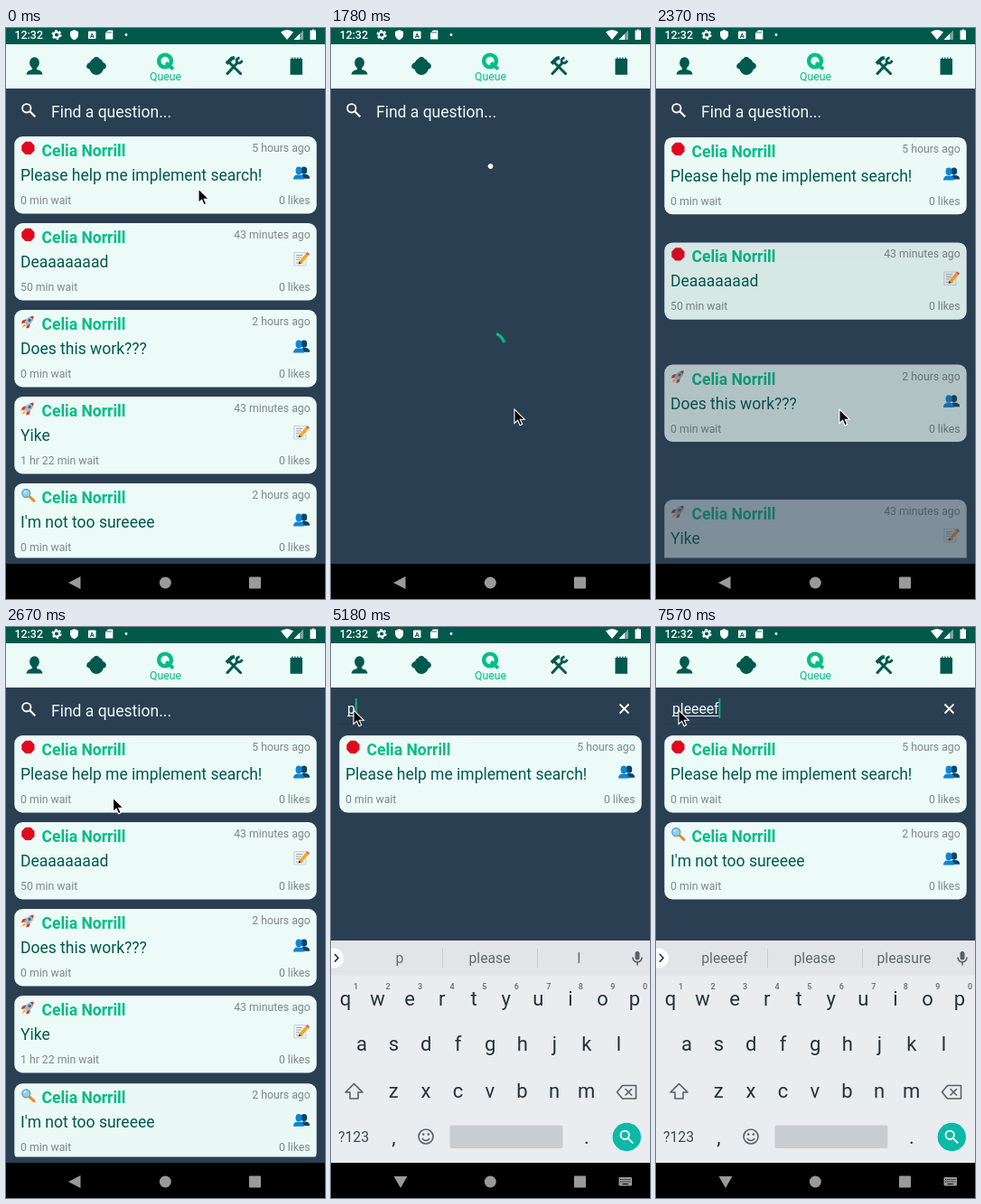
Animation, 353 px wide and 632 px high, one loop 8000 ms. Source, as an HTML page:

```html
<!DOCTYPE html>
<html lang="en">
<head>
<meta charset="utf-8">
<title>Queue search</title>
<style>
html, body { margin: 0; width: 100%; height: 100%; overflow: hidden; background: #2b3f53; }
svg { display: block; }
text { font-family: Roboto, "Noto Sans", sans-serif; white-space: pre; }
.name { font-size: 17.5px; font-weight: 700; fill: #00be85; }
.title { font-size: 17.5px; fill: #00594c; }
.meta { font-size: 12.25px; fill: #7d8886; }
.end { text-anchor: end; }
.mid { text-anchor: middle; }
.field { font-size: 15.75px; fill: #ecfaf6; }
.word { font-size: 15.75px; fill: #616b70; text-anchor: middle; }
.key { font-size: 22px; fill: #253238; text-anchor: middle; }
.hint { font-size: 9px; fill: #626c71; text-anchor: middle; font-weight: 500; }
.line { fill: none; stroke: #566167; stroke-width: 1.6; }
.round { stroke-linecap: round; stroke-linejoin: round; }
</style>
</head>
<body>
<svg id="stage" width="353" height="632" viewBox="0 0 353 632">
  <defs>
    <clipPath id="window"><rect id="windowBox" y="107" width="353" height="479.4"/></clipPath>
    <g id="stop"><path d="M5 .6h5.800l4.200 4.200v5.800l-4.200 4.200H5L.8 10.600V4.800z" fill="#e2081d"/></g>
    <g id="rocket">
      <path d="M6 5 1.5 6.5.5 10l4-1zM10.500 10 9 14.500 5.800 15.300 6.600 11z" fill="#d3342f"/>
      <path d="M3.600 10.400 1 14.800l4.600-2.400z" fill="#f5a623"/>
      <path d="M14 1.500Q9 1.500 6 5.200L3.800 9.200l3 3 4-2.300Q14.200 7 14 1.500z" fill="#a9bac4"/>
      <path d="M14 1.500q-2 0-3.800.9l3 3q.9-1.800.8-3.900z" fill="#d3342f"/>
      <circle cx="9.600" cy="6.200" r="1.600" fill="#31688d"/>
    </g>
    <g id="lens"><path d="m9.500 9.500 5 4.600" stroke="#ef8b22" stroke-width="3" stroke-linecap="round"/><circle cx="5.800" cy="5.800" r="4.500" fill="#8fd0f2" stroke="#6e9db8" stroke-width="1.300"/><path d="M3.300 5.400Q4 3.400 6 3.300" fill="none" stroke="#e6f7ff" stroke-width="1.200"/></g>
    <g id="people">
      <g fill="#0b4468"><ellipse cx="11.800" cy="4.200" rx="3.400" ry="4.100"/><path d="M7 13.200Q8 9 11 8.600h3.200q3.900.5 3.900 4.600z"/></g>
      <g fill="#0d86d6"><ellipse cx="6" cy="4.400" rx="3.500" ry="4.300"/><path d="M0 14q0-4.400 3.900-5h4q3.900.6 3.900 5z"/></g>
    </g>
    <g id="memo">
      <path d="M.8 2h13v14.500h-13z" fill="#eef1f2" stroke="#c0cacc" stroke-width=".8"/>
      <path d="M3 5h7M3 7.500h6M3 10h4M3 13.500h8" stroke="#9fadb2"/>
      <path d="m6.300 11.800 7.800-8.900 2.700 2.400-7.800 8.800z" fill="#f9a51a"/>
      <path d="m14.100 2.900 1.200-1.400 2.700 2.400-1.200 1.400z" fill="#e0485a"/>
      <path d="m6.300 11.800-.7 3.200 3.400-.9z" fill="#4a4038"/>
    </g>
  </defs>

  <rect width="353" height="632" fill="#2b3f53"/>
  <g id="list" clip-path="url(#window)"></g>

  <!-- status bar -->
  <rect width="353" height="18" fill="#00594b"/>
  <g fill="#fff">
    <text x="9.5" y="12" font-size="12.4" font-weight="500">12:32</text>
    <circle cx="56" cy="7.5" r="3.2" fill="none" stroke="#fff" stroke-width="2.2"/>
    <circle cx="56" cy="7.5" r="4.8" fill="none" stroke="#fff" stroke-width="1.5" stroke-dasharray="2.5 2.53"/>
    <path d="m75.500 2 4.500 2v3.500q0 4-4.500 5.800Q71 11.500 71 7.500V4z"/>
    <rect x="91" y="3.500" width="8.500" height="8.500" rx=".8"/>
    <path d="M113 2.500h5.300v10h-8.300V5.500z"/>
    <circle cx="133" cy="7.500" r="1.400"/>
    <path d="M304 4.500q7-5 14 0l-7 8.500z"/>
    <path d="M329 2.500v10.500h-10.500z" opacity=".45"/><path d="M325 6.500v6.500h-6.500z"/>
    <path d="M338 2.500h1V1.500h2v1h2v10.500h-6.500V2.500z"/>
  </g>
  <text x="95.200" y="10.500" class="mid" font-size="7.500" font-weight="700" fill="#00594b">A</text>
  <path d="M112 4v2M114 4v2M116 4v2" stroke="#00594b" stroke-width=".8"/>

  <!-- tabs -->
  <rect y="18" width="353" height="49" fill="#ecfbf7"/>
  <g fill="#00594c">
    <ellipse cx="31.500" cy="38.500" rx="5.400" ry="6.300"/>
    <path d="M29 42h5v4q6 .8 6.500 5.500h-18Q23 46.800 29 46z"/>
    <path d="M93 38q1-3 3.500-4 1.500-2.500 3.500-2 2.500-.2 3.500 2 3 1.200 3.800 4 3.500 1.300 3.600 4.500-.4 2.800-3 3-2 6.300-8 6.500-5.500-.2-7.500-6.500-3-.3-3.300-3 .2-3.200 3.900-4.500z"/>
    <path d="M314.500 34h1.700v-1.500h1.300V34h1.700v-1.500h1.300V34h1.700v-1.500h1.300V34h1.700v-1.500h1.300V34h1.500v17.700h-13.500z"/>
  </g>
  <g fill="none" stroke="#00594c">
    <path d="m248 39 11.500 11.500" stroke-width="3" stroke-linecap="round"/>
    <path d="m256 38.500-11 12" stroke-width="3" stroke-linecap="round"/>
    <path d="m244 39.500 6-6 3-.5" stroke-width="4"/>
    <path d="M258.500 32.800q-4.500 1.200-3 5.200 3.500 2.500 6-2" stroke-width="2.800"/>
  </g>
  <g fill="none" stroke="#00be85">
    <circle cx="176" cy="36.500" r="6.900" stroke-width="4.400"/>
    <path d="m177 38.500 8 7" stroke-width="3.800"/>
  </g>
  <text x="176.500" y="58" class="mid" font-size="12.250" fill="#00be85">Queue</text>

  <!-- search field -->
  <g id="glass" fill="none" stroke="#fff" stroke-width="1.800"><circle cx="22.800" cy="88.800" r="4.700"/><path d="m26.300 92.300 6 6" stroke-width="2.200"/></g>
  <text id="holder" x="50" y="99" font-size="17.500" fill="#ecfaf6">Find a question...</text>
  <g id="focus">
    <path d="M9 107.500h335" stroke="#263848"/>
    <path d="m319.500 85.500 10 10m0-10-10 10" stroke="#fff" stroke-width="1.800"/>
    <text id="typed" class="field" x="18" y="96"></text>
    <path id="under" stroke="#ecfaf6" fill="none"/>
    <rect id="caret" y="79" width="1.700" height="22" fill="#00be85"/>
  </g>

  <!-- loaders -->
  <path id="spin" fill="none" stroke="#00be85" stroke-width="3.200"/>
  <g id="puller"><circle r="18" fill="#14222e" opacity=".25" cy="1"/><circle r="17.500" fill="#fafafa"/><path id="pullArc" d="M7 0A7 7 0 1 1 2-6.700" fill="none" stroke="#222" stroke-width="2.200"/></g>

  <g id="board"></g>

  <!-- navigation bar -->
  <rect y="593" width="353" height="39"/>
  <g fill="#9a9a9a">
    <path id="back"/>
    <circle cx="176.300" cy="614" r="6.500"/>
    <rect x="269" y="607.500" width="13" height="13" rx=".8"/>
    <g id="switch"><rect x="318.500" y="609" width="14.500" height="9.500" rx="1"/><path d="M320 611.500h12M320 614h12" stroke="#000" stroke-width="1.200" stroke-dasharray="1.300 1"/><path d="M322.500 616.500h6.500" stroke="#000"/></g>
  </g>

  <path id="mouse" d="M0 0v15.500l3.600-3.300 2.500 5.600 2.600-1.200-2.500-5.400h5z" stroke="#fff" stroke-width="1.100"/>
</svg>
<script>
const $ = id => document.getElementById(id);
const show = (id, on) => $(id).style.display = on ? '' : 'none';
const LOOP = 8000, TICK = 148.2;

const person = 'Celia Norrill';
const questions = [
  ['stop', 'Please help me implement search!', '5 hours ago', '0 min wait', 'people'],
  ['stop', 'Deaaaaaaad', '43 minutes ago', '50 min wait', 'memo'],
  ['rocket', 'Does this work???', '2 hours ago', '0 min wait', 'people'],
  ['rocket', 'Yike', '43 minutes ago', '1 hr 22 min wait', 'memo'],
  ['lens', "I'm not too sureeee", '2 hours ago', '0 min wait', 'people']
];
$('list').innerHTML = questions.map(([mark, title, age, wait, kind]) => `<g>
  <rect x="9.3" width="334.4" height="85.4" rx="9" fill="#ecfbf7"/>
  <use href="#${mark}" x="16.5" y="5.2"/>
  <text class="name" x="39.5" y="22">${person}</text>
  <text class="title" x="16" y="49">${title}</text>
  <text class="meta" x="16" y="75">${wait}</text>
  <text class="meta end" x="336.7" y="17">${age}</text>
  <text class="meta end" x="336.7" y="75">0 likes</text>
  <use href="#${kind}" x="318" y="${kind === 'memo' ? 30.5 : 33.5}"/></g>`).join('');
const cards = [...$('list').children];

function keyRow(letters, x, y) {
  return [...letters].map((c, i) => `<text class="key" x="${x + i * 35.55}" y="${y}">${c}</text>`).join('');
}
$('board').innerHTML = `
  <rect y="347" width="353" height="246" fill="#e9edf0"/>
  <rect y="347" width="353" height="38.5" fill="#e1e5e7"/>
  <path d="M123.500 356v21M228.500 356v21" stroke="#c6cccf"/>
  <circle cx="3" cy="366.5" r="11" fill="#fff"/>
  <path d="m4 362 4 4.300-4 4.300" class="line" style="stroke:#263238"/>
  <rect x="336.5" y="359" width="5" height="9.5" rx="2.5" fill="#566167"/>
  <path class="line" d="M334 365.500q.3 5.200 5 5.300 4.700-.1 5-5.300M339 371v3.500"/>
  ${[76, 175.5, 274.5].map(x => `<text class="word" x="${x}" y="372.3"></text>`).join('')}
  ${keyRow('qwertyuiop', 16, 418.5)}${keyRow('asdfghjkl', 34, 469.3)}${keyRow('zxcvbnm', 69.3, 521)}
  ${[...'1234567890'].map((c, i) => `<text class="hint" x="${27.5 + i * 35.55}" y="401.3">${c}</text>`).join('')}
  <path class="line round" d="m25.500 505.500 9.500 9.500h-5v7h-9v-7h-5z"/>
  <path class="line round" d="M322.500 507.500h15v14.500h-15l-6-7.200zM326 511.500l6.500 6.500m0-6.500-6.500 6.500"/>
  <text class="word" x="25" y="569.5" style="fill:#3d494e">?123</text>
  <text class="key" x="69.5" y="572">,</text><text class="key" x="283" y="572">.</text>
  <circle class="line" cx="105" cy="564" r="8"/>
  <path class="line" d="M100.800 566q4.200 5 8.400 0"/>
  <circle cx="102.2" cy="561.5" r="1.3" fill="#566167"/><circle cx="107.8" cy="561.5" r="1.3" fill="#566167"/>
  <rect x="131.5" y="551.5" width="125" height="25.5" rx="2" fill="#c8cdd1"/>
  <circle cx="327.3" cy="564.5" r="15.7" fill="#0ab9a6"/>
  <g fill="none" stroke="#fff" stroke-width="1.9"><circle cx="325.2" cy="562.3" r="4.7"/><path d="m328.700 565.800 5.500 5.500"/></g>`;
const words = [...$('board').querySelectorAll('.word')].slice(0, 3);

// pointer stops: tick, x, y
const path = [[0, 213, 178], [4, 211, 174], [7, 207, 160], [8, 204, 370], [9, 203, 422],
  [16, 203, 422], [17, 178, 332], [18, 118.5, 189], [19, 80, 142], [21, 34, 98], [23, 25, 92], [54, 25, 92]];
// tick, text, suggestions
const typing = [[0, '', 'thanks', 'I', 'we'], [34, 'p', 'p', 'please', 'I'], [37, 'pl', 'pl', 'please', 'places'],
  [44, 'ple', 'ple', 'please', 'plenty'], [47, 'plee', 'plee', 'please', 'plenty'], [49, 'pleee', 'pleee', 'please', 'pleasure'],
  [50, 'pleeee', 'pleeee', 'please', 'pleasure'], [51, 'pleeeef', 'pleeeef', 'please', 'pleasure']];
const latest = (rows, n) => rows.filter(r => r[0] <= n).pop();
const ease = u => u < 0.5 ? (2 * u) ** 1.7 / 2 : 1 - (2 - 2 * u) ** 1.7 / 2;
const clamp = u => Math.max(0, Math.min(1, u));

function pointerAt(n) {
  const i = Math.max(1, path.findIndex(p => p[0] >= n));
  const [a, b] = [path[i - 1], path[i]], u = (n - a[0]) / (b[0] - a[0]);
  return [1, 2].map(k => a[k] + (b[k] - a[k]) * u);
}

function drawCards(n) {
  const shown = n < 35 ? [0, 1, 2, 3, 4] : n < 50 ? [0] : [0, 4];
  cards.forEach((card, i) => {
    const slot = shown.indexOf(i);
    const p = n < 10 ? 1 : n < 14 ? 0 : ease(clamp((n * TICK - 1945 - i * 75) / 440));
    card.style.display = slot < 0 || !p ? 'none' : '';
    card.setAttribute('transform', `translate(0 ${120 + slot * 96 + 200 * (1 - p)})`);
    card.setAttribute('opacity', p);
  });
  $('windowBox').setAttribute('height', n < 26 ? 479.4 : 233);
}

function drawLoaders(n) {
  show('spin', n >= 10 && n < 14);
  const k = n - 12, from = -66 + k * 80, to = from + 48 + 110 * Math.abs(Math.sin(k * 0.6));
  const at = d => `${176.5 + 16 * Math.cos(d * Math.PI / 180)} ${353 + 16 * Math.sin(d * Math.PI / 180)}`;
  $('spin').setAttribute('d', `M${at(from)}A16 16 0 0 1 ${at(to)}`);
  show('puller', n >= 8 && n < 13);
  show('pullArc', n < 12);
  const y = n < 9 ? 178 : n < 10 ? 172 : 153, size = n < 11 ? 1 : n < 12 ? 0.6 : 0.16;
  $('puller').setAttribute('transform', `translate(176.5 ${y}) scale(${size}) rotate(${n * 70})`);
}

function drawSearch(n) {
  const [, text] = latest(typing, n), focused = n >= 24;
  show('glass', !focused);
  show('focus', focused);
  show('holder', !text);
  $('typed').textContent = text;
  const width = text ? $('typed').getComputedTextLength() : 0;
  $('under').setAttribute('d', text ? `M18 98.500h${width}` : '');
  $('caret').setAttribute('x', 18 + width);
  show('caret', !(n >= 28 && n < 31 || n >= 41 && n < 44));
}

function drawBoard(n) {
  const open = n >= 25;
  show('board', open);
  show('switch', open);
  $('board').setAttribute('transform', `translate(0 ${n === 25 ? 90 : 0})`);
  $('back').setAttribute('d', open ? 'M69.500 608h15l-7.500 13z' : 'M69 614l13.500-7v14z');
  const row = latest(typing, n);
  words.forEach((w, i) => w.textContent = row[i + 2]);
}

function draw(ms) {
  const n = Math.floor((ms % LOOP + 14) / TICK);
  drawCards(n);
  drawLoaders(n);
  drawSearch(n);
  drawBoard(n);
  $('mouse').setAttribute('transform', `translate(${pointerAt(n)})`);
}

const start = performance.now();
function loop(now) {
  draw(Math.max(0, now - start));
  requestAnimationFrame(loop);
}
draw(0);
requestAnimationFrame(loop);
</script>
</body>
</html>
```
